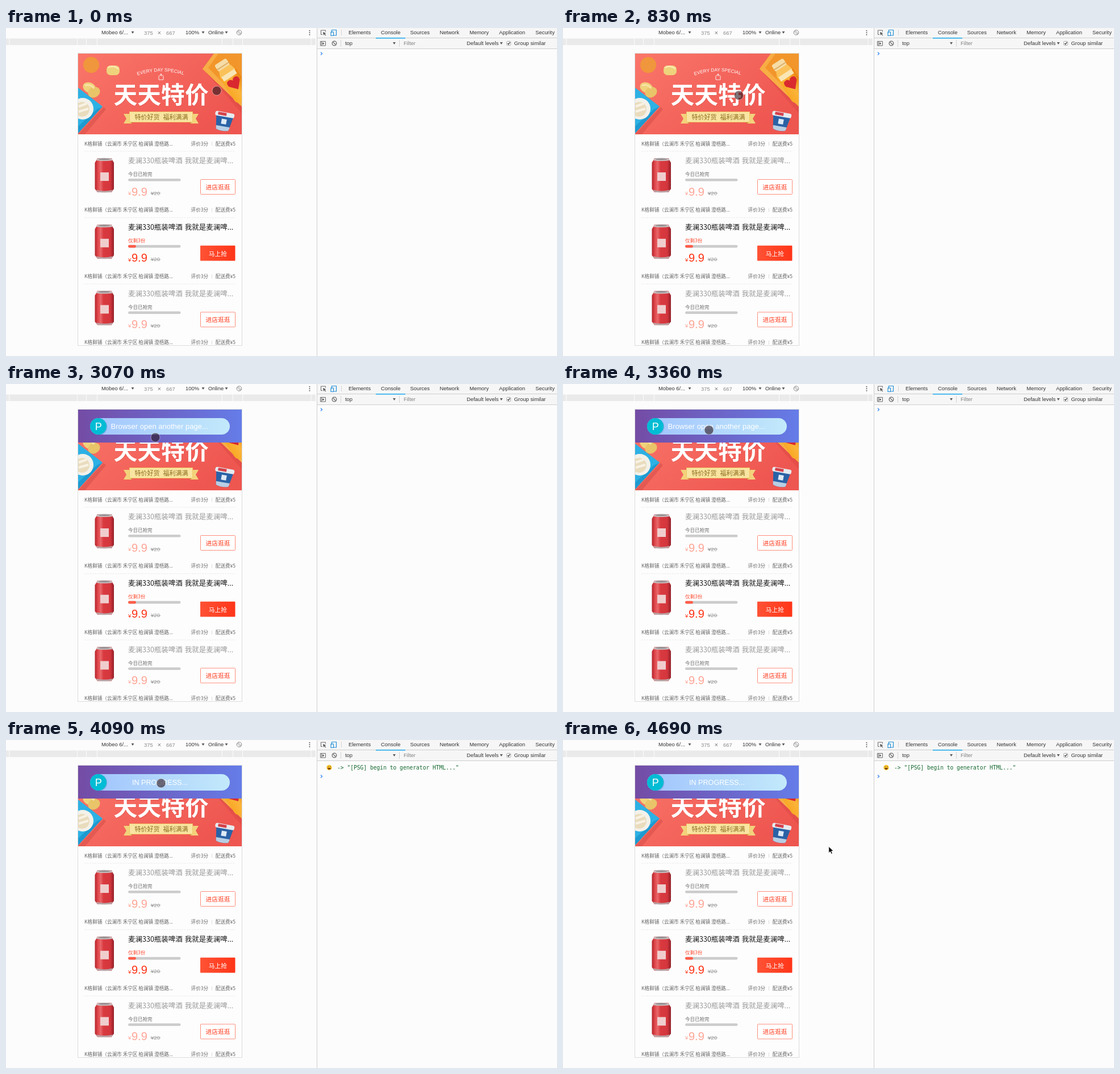
Write an HTML page that moves like this. It is 970 by 577 pixels and loops after 8 s.

```html
<!DOCTYPE html>
<html lang="zh-CN">
<head>
<meta charset="utf-8">
<title>Skeleton preview</title>
<style>
html, body { margin: 0; width: 100%; height: 100%; overflow: hidden; background: #fcfcfc; }
svg { display: block; width: 970px; height: 577px; }
text { font-family: "Liberation Sans", Arial, sans-serif; }
.cjk { font-family: "Noto Sans CJK SC", "Noto Sans CJK", "Noto Sans CJK JP", sans-serif; }
.mono { font-family: "DejaVu Sans Mono", monospace; }
</style>
</head>
<body>
<svg viewBox="0 0 970 577" xmlns="http://www.w3.org/2000/svg">
  <defs>
    <linearGradient id="red" x2="1" y2=".6"><stop stop-color="#fa766a"/><stop offset="1" stop-color="#ee5650"/></linearGradient>
    <linearGradient id="purple"><stop stop-color="#744ca5"/><stop offset="1" stop-color="#657ce8"/></linearGradient>
    <linearGradient id="sky"><stop stop-color="#a1c4fd"/><stop offset="1" stop-color="#c2e9fb"/></linearGradient>
    <linearGradient id="buy"><stop stop-color="#ff5235"/><stop offset="1" stop-color="#ff3518"/></linearGradient>
    <linearGradient id="tin">
      <stop stop-color="#b3242c"/><stop offset=".16" stop-color="#e0474b"/><stop offset=".3" stop-color="#e8676a"/>
      <stop offset=".45" stop-color="#d93a40"/><stop offset=".8" stop-color="#d4363d"/><stop offset="1" stop-color="#94202a"/>
    </linearGradient>
    <linearGradient id="juice"><stop stop-color="#f9a826"/><stop offset=".5" stop-color="#fbb53a"/><stop offset="1" stop-color="#ea8412"/></linearGradient>
    <clipPath id="screen"><path d="M127 45H415V558H127Z"/></clipPath>
    <clipPath id="hero"><path d="M127 45H415V187H127Z"/></clipPath>
    <path id="arc" d="M231.500 83.500Q273 69 315.500 83.500"/>
    <g id="can">
      <path d="M161 229H185.500L190 237V283L185.500 289H161L156.500 283V237Z" fill="url(#tin)"/>
      <path d="M161 229.500Q173 227.500 185.500 229.500L187.500 233Q173 235 159 233Z" fill="#c9c0c1"/>
      <ellipse cx="173" cy="230.800" rx="10.500" ry="1.400" fill="#948c8e"/>
      <path d="M158.500 284.800Q173 288.500 188 284.800L185.500 288.500Q173 290.500 161 288.500Z" fill="#b9a5a6"/>
      <rect x="166" y="254" width="15" height="15" fill="#f0cdcd"/>
    </g>
  </defs>

  <rect width="970" height="577" fill="#fcfcfc"/>

  <g id="tools">
    <path d="M0 18.500H545V30H0Z" fill="#eaeaea"/>
    <path d="M6 18V30M125.500 18V30M141.500 18V30M160.500 18V30M380.500 18V30M399.500 18V30M416.500 18V30M537 18V30" stroke="#fcfcfc"/>
    <path d="M548 0H970V36H548Z" fill="#f6f6f6"/>
    <path d="M547.500 0V577M548 17.500H970M548 36.500H970" stroke="#cfcfcf"/>
    <path d="M590.500 3V13M589.500 21V33M692.500 21V33" stroke="#d4d4d4"/>
    <path d="M651 17H703V18.600H651Z" fill="#1aa5ec"/>
    <g fill="#5a5a5a">
      <path d="M220.500 6H225.500L223 10ZM344.500 6H349.500L347 10ZM385.500 6H390.500L388 10ZM681 25H686L683.500 29ZM869.500 25H874.500L872 29Z"/>
      <circle cx="534.500" cy="4.800" r="1"/><circle cx="534.500" cy="8.300" r="1"/><circle cx="534.500" cy="11.800" r="1"/>
      <path d="M558 7L563.500 9.300L561.200 10.200L563.300 12.600L562.400 13.400L560.300 11L559 13Z"/>
      <path d="M557 25L560.500 27.200L557 29.400Z"/>
    </g>
    <g fill="none" stroke="#6a6a6a">
      <path d="M267.800 6.300L272 10.700M272 6.300L267.800 10.700"/>
      <circle cx="410.500" cy="8" r="4.300" stroke="#888"/>
      <path d="M407.800 6.500L412 11L413.500 9.500L409.300 5Z" stroke="#888" stroke-width=".9"/>
      <path d="M557 11.500H554.500V4H562.500V6.500"/>
      <path d="M553.500 23.500H562.500V31H553.500ZM555.500 23.500V31"/>
      <circle cx="578" cy="27" r="3.800" stroke-width="1.300"/><path d="M575.500 24.500L580.500 29.500" stroke-width="1.300"/>
      <path d="M573.500 8V3.500H581.500V13H577M572 7H576.500V13.500H572Z" stroke="#2490d8" stroke-width="1.200"/>
    </g>
    <rect x="881.500" y="23.500" width="7" height="7" rx="1.300" fill="#fff" stroke="#aaa"/>
    <path d="M883 27L884.600 28.800L887.300 24.800" fill="none" stroke="#333" stroke-width="1.200"/>
  </g>

  <rect x="126.500" y="44.500" width="289" height="514" fill="#fdfdfd" stroke="#dcdcdc"/>
  <g clip-path="url(#screen)">
    <g id="banner" clip-path="url(#hero)">
      <path d="M127 45H415V187H127Z" fill="url(#red)"/>
      <path d="M352 78L415 150V130L380 92Z" fill="#d94540" opacity=".45"/>
      <path d="M346 72L366 45H415V138Z" fill="#f2962b"/>
      <path d="M346 72L366 45H374L356 70L415 130V138Z" fill="#f8ad45"/>
      <g transform="translate(3 0) rotate(-33 390 86)">
        <rect x="375" y="71" width="33" height="64" rx="9" fill="url(#juice)"/>
        <path d="M381 65H402L407 80H376Z" fill="#fbc25a"/>
        <rect x="379" y="55" width="24" height="13" rx="3" fill="#f6dca6"/>
        <path d="M379 64H403" stroke="#dcae68" stroke-width="2"/>
        <path d="M378 79H405V88H378Z" fill="#f9e6b5"/>
        <path d="M391.500 113L380 100Q378 91 386 91Q390 91 391.500 95Q393 91 398 91Q405 92 403 100Z" fill="#d9292f"/>
      </g>
      <g fill="#efd27c">
        <rect x="177" y="66" width="23" height="17" rx="7"/>
        <ellipse cx="147" cy="105" rx="12" ry="9" transform="rotate(24 147 105)"/>
        <ellipse cx="155" cy="113" rx="11" ry="9" fill="#e9c469" transform="rotate(-28 155 113)"/>
      </g>
      <path d="M179 70Q188 64 198 72" fill="none" stroke="#f9e7a9" stroke-width="3"/>
      <path d="M139 101Q149 98 155 106" fill="none" stroke="#f8e4a5" stroke-width="3"/>
      <path d="M127 187L172 139L176 143L139 187Z" fill="#cf4843" opacity=".45"/>
      <path d="M127 105L170 138L127 185Z" fill="#2db1e4"/>
      <path d="M127 173L160 143L170 138L127 185Z" fill="#1e9ad0"/>
      <circle cx="135" cy="142" r="19" fill="#f3f1ea"/>
      <circle cx="134" cy="143" r="13" fill="#e9dcbd"/>
      <path d="M128 138L142 133M128 147L145 142" stroke="#f8f2e4" stroke-width="4"/>
      <circle cx="150" cy="65" r="14" fill="#f0963c"/>
      <path d="M269 84.500L273 81.500L277 84.500V91H269Z" fill="none" stroke="#fff" stroke-opacity=".85"/>
      <path d="M273 85V80" stroke="#fff"/>
      <text font-size="8.200" fill="#fff"><textPath href="#arc">EVERY DAY SPECIAL</textPath></text>
      <path d="M207 151H222V168H207L212 159.500ZM339 151H324V168H339L334 159.500Z" fill="#f3d27c"/>
      <path d="M217 165L222 168V165ZM329 165L324 168V165Z" fill="#b98b2f"/>
      <path d="M217.500 147.500H328.500V165.500H217.500Z" fill="#f9e5a2" stroke="#eec765"/>
      <g transform="rotate(10 383 165)">
        <path d="M368 153H399L394 179Q383 183 372 179Z" fill="#2a62a6"/>
        <path d="M371 173H395.500L394 179Q383 183 372 179Z" fill="#b8cee4"/>
        <rect x="366" y="148" width="34" height="8" rx="3" fill="#e6eaee"/>
        <path d="M371 149H386V154H371Z" fill="#d5404a"/>
        <rect x="379" y="160" width="9" height="9" fill="#dfeaf5"/>
      </g>
    </g>
    <g id="rows"></g>
    <g id="toast">
      <path d="M127 45H415V103H127Z" fill="url(#purple)"/>
      <rect x="148" y="60" width="246" height="29" rx="14.500" fill="url(#sky)"/>
      <circle cx="163.500" cy="75.200" r="14.800" fill="#3d6fa8" opacity=".3"/>
      <circle cx="162.500" cy="74.500" r="14.500" fill="#00bcd4"/>
      <text x="156.800" y="81" font-size="18" fill="#fff">P</text>
      <text id="msg" y="79.300" fill="#fff"></text>
    </g>
  </g>

  <g id="log">
    <circle cx="569" cy="48.500" r="4.700" fill="#fbc62f"/>
    <path d="M567.300 46V47.500M570.700 46V47.500" stroke="#6b4312" stroke-width="1.100"/>
    <path d="M566 49H572Q571.500 52 569 52Q566.500 52 566 49Z" fill="#7a4310"/>
    <text class="mono" x="583" y="52" font-size="9.650" fill="#14692f">-&gt; "[PSG] begin to generator HTML..."</text>
  </g>
  <path id="prompt" d="M554 -2.500L556.600 0L554 2.500" fill="none" stroke="#3f8cf0" stroke-width="1.300"/>

  <g id="dot">
    <circle r="8" fill="#28141c" fill-opacity=".6"/>
    <circle r="8" fill="none" stroke="#fff" stroke-opacity=".42"/>
  </g>
  <path id="arrow" d="M0 0V11.500L2.700 9L4.500 13.200L6.600 12.300L4.800 8.200H8.400Z" fill="#000" stroke="#fff" stroke-width=".9"/>
</svg>
<script>
const $ = id => document.getElementById(id);
const NS = "http://www.w3.org/2000/svg";

function add(parent, tag, attrs, text) {
  const el = document.createElementNS(NS, tag);
  for (const k in attrs) el.setAttribute(k, attrs[k]);
  if (text) el.textContent = text;
  parent.appendChild(el);
  return el;
}

// Text placed by its left edge and vertical centre
function label(parent, x, cy, size, fill, text, more) {
  return add(parent, "text", { x, y: cy + size * 0.37, "font-size": size, fill, ...more }, text);
}
const cjk = (parent, x, cy, size, fill, text, more) =>
  label(parent, x, cy, size, fill, text, { class: "cjk", ...more });

const tools = $("tools");
[[168, "Mobeo 6/..."], [316, "100%"], [356, "Online"], [603, "Elements"], [660, "Console"],
 [711.5, "Sources"], [763.5, "Network"], [816, "Memory"], [868, "Application"], [932, "Security"]]
  .forEach(([x, s]) => label(tools, x, 7.8, 9.4, "#333", s));
[[243, "375"], [282, "667"]].forEach(([x, s]) => label(tools, x, 8.3, 9.4, "#8a8a8a", s));
[[597, "top"], [811, "Default levels"], [894.5, "Group similar"]]
  .forEach(([x, s]) => label(tools, x, 26.8, 9.4, "#333", s));
label(tools, 700, 26.8, 9.4, "#808080", "Filter");

const banner = $("banner");
const bold = { "font-weight": 700 };
cjk(banner, 190, 118.8, 41.8, "#c9433f", "天天特价", { ...bold, opacity: 0.35 });
cjk(banner, 189.5, 117.8, 41.8, "#fff", "天天特价", bold);
cjk(banner, 226.5, 156.5, 11, "#8d6b1c", "特价好货");
cjk(banner, 276.5, 156.5, 11, "#8d6b1c", "福利满满");

const rows = $("rows");
function shop(y) {
  const g = add(rows, "g", { transform: `translate(0 ${y})` });
  cjk(g, 138, 203.5, 8.6, "#666", "K格鲜铺（云澜市 禾宁区 柏澜镇 澄梧路...");
  cjk(g, 356, 203.5, 8.55, "#666", "评价3分", { "text-anchor": "end" });
  cjk(g, 404, 203.5, 8.55, "#666", "配送费¥5", { "text-anchor": "end" });
  add(g, "path", { d: "M362.5 200V207", stroke: "#ddd" });
  return g;
}

function item(y, live) {
  const g = shop(y);
  const ink = live ? "#151515" : "#9a9a9a";
  const price = live ? "#ff3216" : "#ffa596";
  add(g, "path", { d: "M138 216.8H404", stroke: "#ebebeb", "stroke-dasharray": "3 1.5" });
  add(g, "use", { href: "#can" });
  cjk(g, 215, 233.5, 12.5, ink, "麦澜330瓶装啤酒");
  cjk(g, 314.8, 233.5, 12.5, ink, "我就是麦澜啤...");
  cjk(g, 215, 257, 8.5, live ? "#ff4a30" : "#666", live ? "仅剩3份" : "今日已抢完");
  add(g, "rect", { x: 215, y: 265, width: 92.5, height: 4.6, rx: 2.3, fill: "#ccc" });
  if (live) add(g, "rect", { x: 215, y: 265, width: 14, height: 4.6, rx: 2.3, fill: "#ff5d4a" });
  label(g, 215, 290.3, 9.5, price, "¥");
  label(g, 221, 287.2, 20, price, "9.9");
  label(g, 255, 290, 9.6, "#999", "¥20");
  add(g, "path", { d: "M254.5 290.5H272", stroke: "#999", "stroke-width": 0.9 });
  add(g, "rect", live
    ? { x: 342, y: 266, width: 61.5, height: 26.6, rx: 1, fill: "url(#buy)" }
    : { x: 342.5, y: 266.5, width: 61, height: 26, rx: 1, fill: "#fff", stroke: "#ff8d7a" });
  cjk(g, 373, 280, 10.75, live ? "#fff" : "#ff3c1e", live ? "马上抢" : "进店逛逛",
    { "text-anchor": "middle", "font-weight": 500 });
}
item(0, false);
item(116.8, true);
item(233.4, false);
shop(349.8);

// Pointer stops: start time, x, y
const LOOP = 8000, TOAST = 2170, START = 4090, LEAVE = 4390;
const stops = [
  [0, 371, 110.3], [500, 356, 110.5], [680, 309, 118], [830, 309.5, 118.5],
  [3070, 263, 94], [3220, 257, 87], [3360, 257, 81], [3510, 266, 77], [3650, 273, 76],
  [LEAVE, 430.5, 157.5], [4540, 458.5, 178.5], [4690, 467.8, 187.3]
];
const show = (id, on) => $(id).setAttribute("visibility", on ? "visible" : "hidden");

function draw(t) {
  const [, x, y] = stops.filter(s => s[0] <= t).pop();
  const busy = t >= START, gone = t >= LEAVE;
  show("dot", !gone);
  show("arrow", gone);
  $(gone ? "arrow" : "dot").setAttribute("transform", `translate(${x} ${y})`);
  show("toast", t >= TOAST);
  show("log", busy);
  $("prompt").setAttribute("transform", `translate(0 ${busy ? 64 : 45})`);
  const msg = $("msg");
  msg.textContent = busy ? "IN PROGRESS..." : "Browser open another page...";
  msg.setAttribute("x", busy ? 222 : 184.5);
  msg.setAttribute("font-size", busy ? 12.6 : 13);
}

function tick() {
  draw(performance.now() % LOOP);
  requestAnimationFrame(tick);
}
tick();
</script>
</body>
</html>
```
